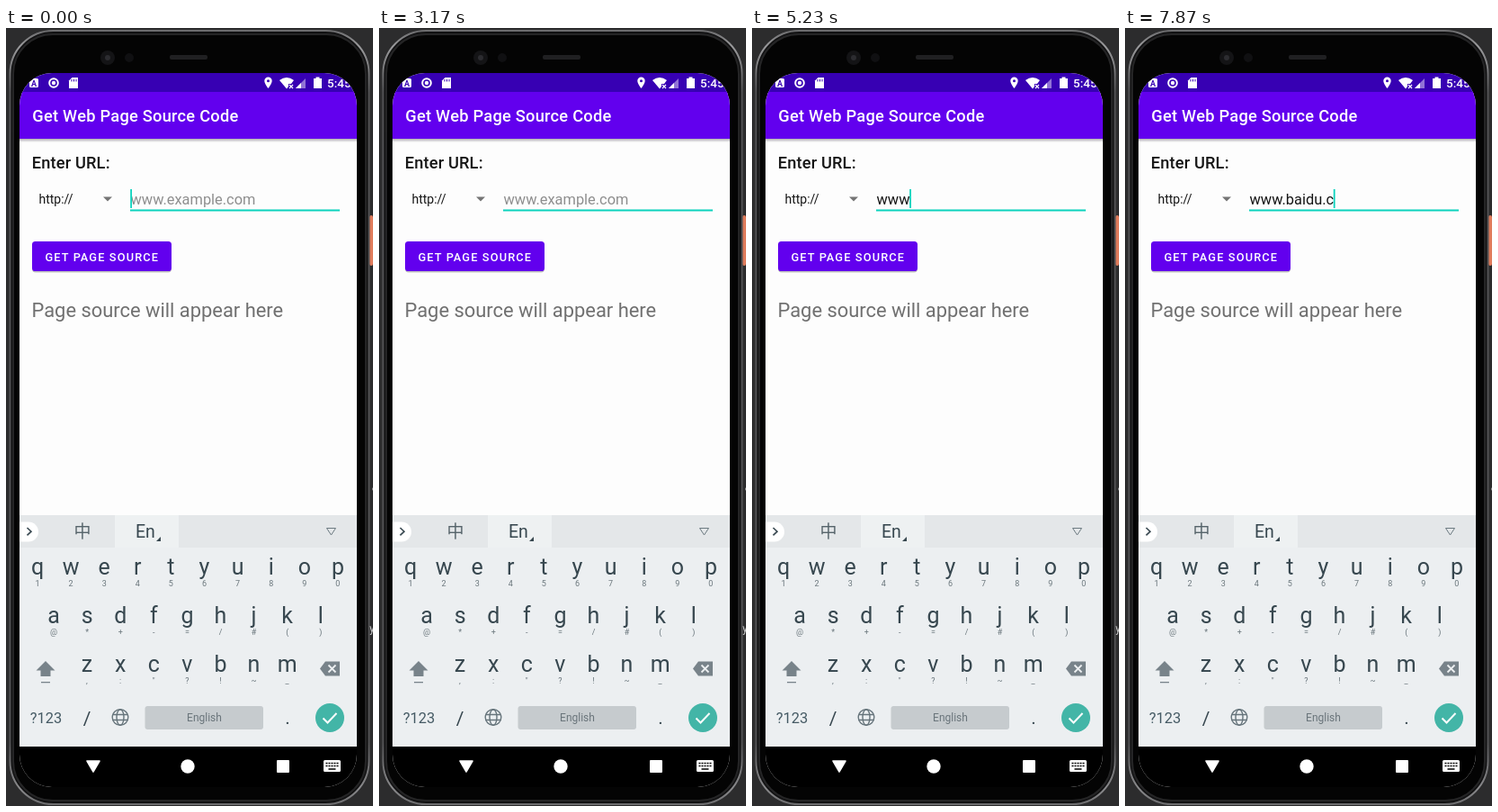
An HTML page that plays this animation: 408 px wide and 864 px high, repeating every 8000 ms.

```html
<!DOCTYPE html>
<html lang="en">
<head>
<meta charset="utf-8">
<title>Get Web Page Source Code</title>
<style>
html, body { margin: 0; width: 100%; height: 100%; overflow: hidden; background: #2c2c2d; }
svg { display: block; width: 408px; height: 864px; }
text { font-family: Roboto, "Noto Sans", sans-serif; white-space: pre; }
.mid { text-anchor: middle; }
.key { font-size: 25px; fill: #37474f; text-anchor: middle; }
.sub { font-size: 9px; fill: #6a767c; text-anchor: middle; }
</style>
</head>
<body>
<svg viewBox="0 0 408 864" xmlns="http://www.w3.org/2000/svg">
  <defs>
    <clipPath id="screen"><rect x="15" y="50" width="375" height="793" rx="36"/></clipPath>
    <linearGradient id="rim" x2="0" y2="1">
      <stop stop-color="#6c6c6e"/><stop offset=".02" stop-color="#9a9a9c"/>
      <stop offset=".08" stop-color="#525254"/><stop offset=".92" stop-color="#525254"/>
      <stop offset=".98" stop-color="#8a8a8c"/><stop offset="1" stop-color="#6c6c6e"/>
    </linearGradient>
    <linearGradient id="shade" x2="0" y2="1">
      <stop stop-color="#707070" stop-opacity=".55"/><stop offset="1" stop-color="#707070" stop-opacity="0"/>
    </linearGradient>
  </defs>

  <!-- desktop and phone body -->
  <rect width="408" height="864" fill="#2c2c2d"/>
  <rect x="404" y="208" width="4" height="56" rx="2" fill="#e07c5c"/>
  <path d="M409 509q-3 3 0 6" fill="none" stroke="#b4b4b4"/>
  <text id="sideY" x="404" y="671" font-size="12" fill="#d4d4d4">y</text>
  <path id="sidePlus" d="M404.500 585.500h4M407.500 582.500v6" stroke="#d4d4d4" stroke-width="1.300"/>
  <rect x="4.500" y="3" width="399" height="859" rx="48" fill="#121213" stroke="url(#rim)" stroke-width="2"/>
  <rect x="8" y="7" width="392" height="851" rx="44" fill="#040404" stroke="#252526" stroke-width="2"/>
  <circle cx="113" cy="33" r="8" fill="#141416"/>
  <circle cx="113" cy="33" r="3" fill="#2c2c30"/>
  <circle cx="137" cy="33" r="5" fill="#101012"/>
  <rect x="182" y="30" width="42" height="5" rx="2" fill="#202022"/>

  <g clip-path="url(#screen)">
    <rect x="15" y="50" width="375" height="793" fill="#fdfdfd"/>
    <rect x="15" y="50" width="375" height="22" fill="#3700b3"/>
    <rect x="15" y="71" width="375" height="52" fill="#6200ee"/>
    <rect x="15" y="123" width="375" height="4" fill="url(#shade)"/>

    <!-- status bar -->
    <g fill="#fff">
      <rect x="26" y="56" width="10" height="10" rx="1.500"/>
      <text class="mid" x="31" y="64.500" font-size="9" font-weight="700" style="fill:#3700b3">A</text>
      <circle cx="53" cy="61" r="4.800" fill="none" stroke="#fff" stroke-width="2"/>
      <circle cx="53" cy="61" r="2.200"/>
      <path d="M73.500 55H80V67H70V58.500Z"/>
      <path d="M73 57v2.500M75.500 57v2.500M78 57v2.500" stroke="#3700b3"/>
      <path fill-rule="evenodd" d="M291.500 54.500a4.200 4.200 0 0 1 4.200 4.200c0 3-4.200 8.300-4.200 8.300s-4.200-5.300-4.200-8.300a4.200 4.200 0 0 1 4.200-4.200m0 2.700a1.500 1.500 0 1 0 0 3a1.500 1.500 0 1 0 0-3"/>
      <path d="M304 58q8-6 16 0l-3 4h-3v3l-2 2.500z"/>
      <path d="M315 63l4 4M319 63l-4 4" stroke="#fff" stroke-width="1.200"/>
      <path d="M322 67L333 56V67Z" opacity=".45"/>
      <path d="M322 67L328 61V67Z"/>
      <path d="M342 56h2.500v-1.500h4V56H351V67H342Z"/>
    </g>
    <text x="357" y="66" font-size="13.500" font-weight="500" fill="#fff">5:45</text>

    <!-- page -->
    <text x="29.300" y="104" font-size="18.250" font-weight="500" letter-spacing=".240" fill="#fff">Get Web Page Source Code</text>
    <text x="28.800" y="156" font-size="18.250" font-weight="500" letter-spacing=".150" fill="#151515">Enter URL:</text>
    <text x="36.500" y="195" font-size="14" fill="#151515">http://</text>
    <path d="M108 187.500h10l-5 5z" fill="#757575"/>
    <rect x="138" y="201.500" width="233" height="2" fill="#0cd3bd"/>
    <text id="hint" x="138.500" y="195.500" font-size="16.400" fill="#8e8e8e">www.example.com</text>
    <text id="typed" x="138.500" y="195.500" font-size="16.400" fill="#151515"></text>
    <rect id="caret" y="179" width="1.800" height="21" fill="#0cd3bd"/>
    <rect x="29" y="238.500" width="155" height="33" rx="4" fill="#808080" opacity=".5"/>
    <rect x="29" y="237" width="155" height="33" rx="3.600" fill="#6200ee"/>
    <text x="43.500" y="258.700" font-size="12.770" font-weight="500" letter-spacing="1.140" fill="#fff">GET PAGE SOURCE</text>
    <text x="28.500" y="321" font-size="21.900" fill="#707070">Page source will appear here</text>

    <!-- keyboard -->
    <rect x="15" y="541" width="375" height="257" fill="#eceff1"/>
    <rect x="15" y="541" width="375" height="36" fill="#e4e7e9"/>
    <rect x="121" y="541" width="71" height="36" fill="#eef1f2"/>
    <rect x="5" y="548.500" width="31" height="22" rx="11" fill="#fff"/>
    <path d="M23.500 555l4.500 4.200l-4.500 4.200" fill="none" stroke="#37474f" stroke-width="1.600"/>
    <text class="mid" x="85" y="566" font-size="19" fill="#56646b" style="font-family:'Noto Sans CJK SC','Noto Sans CJK',sans-serif">中</text>
    <text x="144" y="566" font-size="19.500" fill="#37474f">En</text>
    <path d="M172 565v5h-5z" fill="#37474f"/>
    <path d="M356.500 555.500h10l-5 7.500z" fill="none" stroke="#6c7a81"/>
    <g id="keys"></g>
    <g fill="#78838a">
      <path d="M44 703l10.500 10.500H49.500V720H38.500V713.500H33.500Z"/>
      <rect x="39" y="726" width="10" height="1.300"/>
      <path d="M355 703.500H371V719.500H355L349 711.500Z"/>
    </g>
    <path d="M358.500 707.500l8 8m0-8l-8 8" stroke="#eceff1" stroke-width="1.800"/>
    <text class="mid" x="44.500" y="772" font-size="16.400" fill="#455a64">?123</text>
    <text class="mid" x="90" y="774" font-size="21" fill="#37474f">/</text>
    <text class="mid" x="313" y="773" font-size="21" fill="#37474f">.</text>
    <g fill="none" stroke="#66747b" stroke-width="1.400">
      <circle cx="127" cy="765.500" r="8.800"/>
      <ellipse cx="127" cy="765.500" rx="4" ry="8.800"/>
      <path d="M119 762.500h16M119 768.500h16"/>
    </g>
    <rect x="154.500" y="753" width="131.500" height="26" rx="3" fill="#c6cbce"/>
    <text class="mid" x="220.500" y="770.300" font-size="12" fill="#6a757b">English</text>
    <circle cx="360" cy="766" r="16" fill="#43b5a7"/>
    <path d="M352.500 766.500l5 5l10-10.500" fill="none" stroke="#fff" stroke-width="2"/>

    <!-- navigation bar -->
    <rect x="15" y="798" width="375" height="45" fill="#000"/>
    <g fill="#fff">
      <path d="M90 814h14l-7 12z" stroke="#fff" stroke-width="1.500" stroke-linejoin="round"/>
      <circle cx="202" cy="820" r="7.700"/>
      <rect x="301" y="813" width="14" height="14" rx="1"/>
      <rect x="353" y="813" width="19" height="13" rx="1.500"/>
    </g>
    <path d="M355.500 816.500h14M355.500 819.500h14" stroke="#000" stroke-width="1.600" stroke-dasharray="2 1"/>
    <path d="M358.500 823h8" stroke="#000" stroke-width="1.600"/>
  </g>
</svg>
<script>
const LOOP = 8000, BLINK = 500, FIRST_OFF = 170;
const address = "www.baidu.c";
const presses = [4300, 4570, 4830, 5630, 6030, 6230, 6370, 6730, 6970, 7470, 7700];
const rows = [
  ["qwertyuiop", "1234567890", 35, 607],
  ["asdfghjkl", "@*+-=/#()", 53, 661],
  ["zxcvbnm", ",:\"?!~_", 90, 714.5]
];
const $ = id => document.getElementById(id);

function label(cls, x, y, str) {
  const el = document.createElementNS("http://www.w3.org/2000/svg", "text");
  el.setAttribute("class", cls);
  el.setAttribute("x", x);
  el.setAttribute("y", y);
  el.textContent = str;
  $("keys").append(el);
}

for (const [letters, subs, left, base] of rows) {
  [...letters].forEach((ch, i) => {
    const x = left + i * 37.1;
    label("key", x, base, ch);
    label("sub", x, base + 13, subs[i]);
  });
}

const show = (el, on) => el.setAttribute("visibility", on ? "visible" : "hidden");
const hint = $("hint"), typed = $("typed"), caret = $("caret");

function draw(t) {
  const count = presses.filter(p => p <= t).length;
  const str = address.slice(0, count);
  if (typed.textContent !== str) typed.textContent = str;
  show(hint, !count);

  // each key press restarts the blink
  const since = count ? t - presses[count - 1] : t + BLINK - FIRST_OFF;
  show(caret, Math.floor(since / BLINK) % 2 === 0);
  caret.setAttribute("x", 138.2 + (count ? typed.getComputedTextLength() : 0));

  show($("sideY"), t < 6400);
  show($("sidePlus"), t >= 6400 && t < 7800);
}

const start = performance.now();
function tick() {
  draw((performance.now() - start) % LOOP);
  requestAnimationFrame(tick);
}
tick();
</script>
</body>
</html>
```
